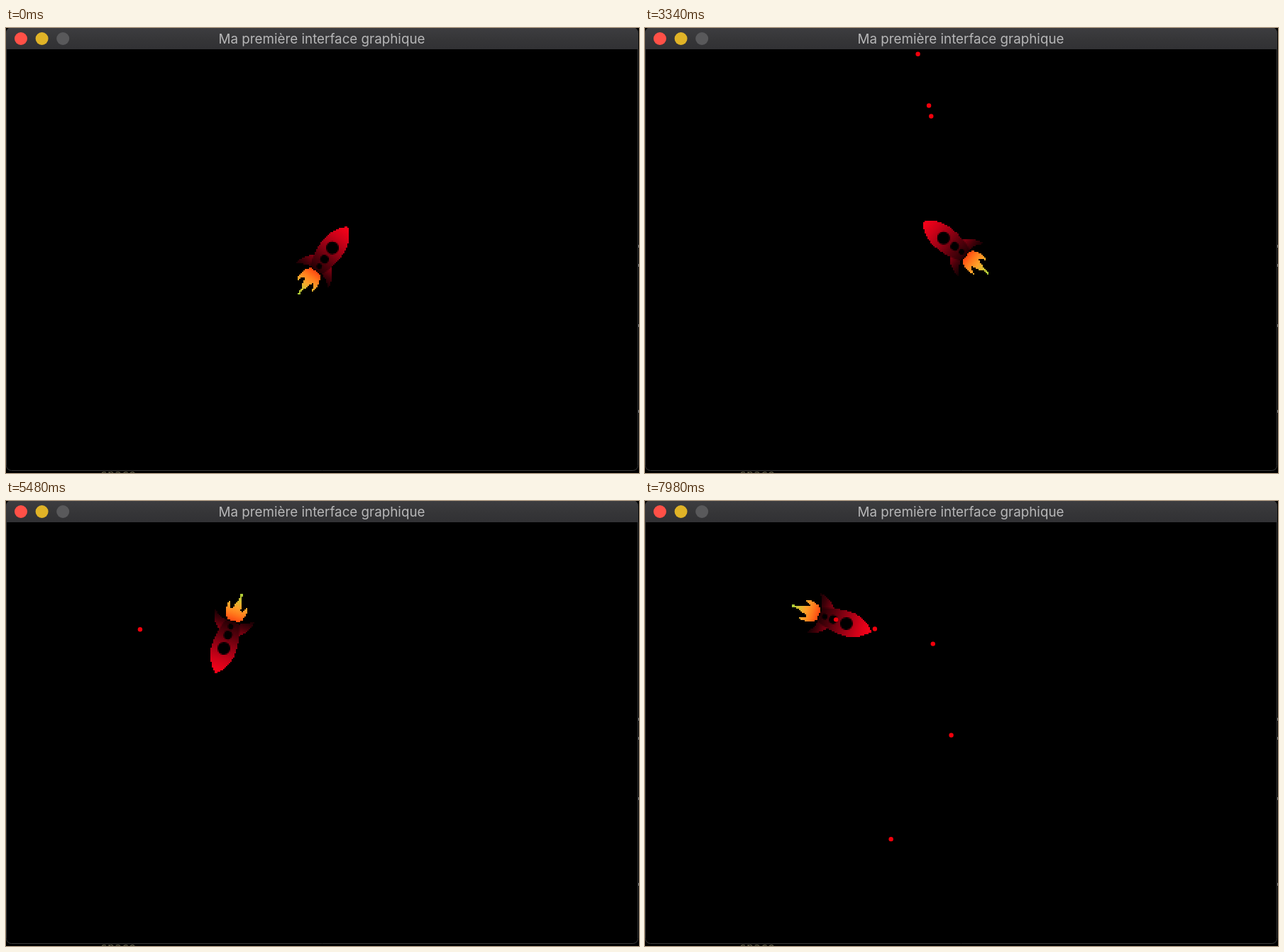
Write an HTML page with a canvas that moves like this. It is 892 px wide and 628 px high and loops after 8 s.

```html
<!DOCTYPE html>
<html lang="fr">
<head>
<meta charset="utf-8">
<title>Fusée</title>
<style>
  html, body { margin: 0; width: 100%; height: 100%; overflow: hidden; background: #000; }
  canvas { display: block; }
</style>
</head>
<body>
<canvas id="stage" width="892" height="628"></canvas>
<script>
const LOOP = 8;
const RAD = Math.PI / 180;
const HOME = { x: 446.5, y: 328 };
const START_ANGLE = 36.3;
const TURN_RATE = 65;
const SHOT_SPEED = 156;

// The flight follows from the pilot's input, in seconds: left key held,
// thrust taps with the speed they add, and shots.
const TURNS = [{ from: 0.53, to: 1.273 }, { from: 2.45, to: 3.058 }, { from: 3.786, to: 6.866 }];
const TAPS = [
  { at: 2.4, power: 14 },
  { at: 3.23, power: 70.3 },
  { at: 6.13, power: 63 },
  { at: 7, power: 35 },
  { at: 7.55, power: 36 }
];
const SHOTS = [1.432, 1.909, 2.007, 4.02, 5.925, 6.415, 6.93, 7.47, 7.93];

const ctx = document.getElementById('stage').getContext('2d');

// The rocket is drawn at half size, then enlarged with hard pixels.
const CELL = 72;
const sprite = document.createElement('canvas');
sprite.width = sprite.height = CELL;
const pen = sprite.getContext('2d', { willReadFrequently: true });

// Degrees clockwise from up
function heading(t) {
  const held = TURNS.reduce((sum, { from, to }) => sum + Math.max(0, Math.min(t, to) - from), 0);
  return START_ANGLE - TURN_RATE * held;
}

function advance(p, angle, d) {
  return { x: p.x + Math.sin(angle * RAD) * d, y: p.y - Math.cos(angle * RAD) * d };
}

// Frictionless drift: every tap adds a constant velocity along its heading.
function position(t) {
  return TAPS.filter(tap => tap.at < t)
    .reduce((p, { at, power }) => advance(p, heading(at), power * (t - at)), HOME);
}

function shade(c, y0, y1, colors) {
  const g = c.createLinearGradient(0, y0, 0, y1);
  colors.forEach((color, i) => g.addColorStop(i / (colors.length - 1), color));
  return g;
}

function disc(c, x, y, r, color) {
  c.fillStyle = color;
  c.beginPath();
  c.arc(x, y, r, 0, Math.PI * 2);
  c.fill();
}

// Shapes point up, centred on the pivot
const BODY = new Path2D('M0-59C9-52 17.5-38 17.5-23C17.5-8 15 6 10 17H-10C-15 6-17.5-8-17.5-23C-17.5-38-9-52 0-59Z');
const FIN = new Path2D('M14 1C24 8 28 16 29 28C24 22 18 19 10 17Z');
const HALF_FLAME = new Path2D('M-1 19H8C14 24 17 34 13 46C12 40 10 35 7 34C5 36 5 46 1.5 49L1 59H-1Z');
const BODY_FILL = shade(pen, -58, 17, ['#fa0219', '#d00118', '#980114', '#5a000c', '#250004']);
const FIN_FILL = shade(pen, 1, 28, ['#8c0012', '#440009', '#0e0002']);
const FLAME_FILL = shade(pen, 19, 58, ['#ff4a12', '#ff7a1c', '#ffa029', '#d8bd32', '#a9cc38']);

function drawRocket(t) {
  pen.setTransform(1, 0, 0, 1, 0, 0);
  pen.clearRect(0, 0, CELL, CELL);
  pen.translate(CELL / 2, CELL / 2);
  pen.rotate(heading(t) * RAD);
  pen.scale(0.5, 0.5);
  for (let side = 0; side < 2; side++) {
    pen.fillStyle = FIN_FILL;
    pen.fill(FIN);
    pen.fillStyle = FLAME_FILL;
    pen.fill(HALF_FLAME);
    pen.scale(-1, 1);
  }
  pen.fillStyle = BODY_FILL;
  pen.fill(BODY);
  disc(pen, 0, -22, 9, '#000');
  disc(pen, 0.5, -2.5, 6, '#000');
  disc(pen, 0.5, 10, 4, '#000');

  const img = pen.getImageData(0, 0, CELL, CELL);
  for (let i = 3; i < img.data.length; i += 4) img.data[i] = img.data[i] > 120 ? 255 : 0;
  pen.putImageData(img, 0, 0);

  const { x, y } = position(t);
  ctx.imageSmoothingEnabled = false;
  ctx.drawImage(sprite, Math.round(x - CELL), Math.round(y - CELL), CELL * 2, CELL * 2);
}

function drawShots(t) {
  for (const born of SHOTS.filter(s => s <= t)) {
    const { x, y } = advance(position(born), heading(born), (t - born) * SHOT_SPEED);
    disc(ctx, x, y, 3.2, '#f2000c');
  }
}

const BAR_FILL = shade(ctx, 0, 30, ['#3d3d40', '#363638', '#313134']);

function drawWindow() {
  ctx.fillStyle = '#000';
  ctx.fillRect(0, 0, 892, 628);

  // Slivers of the editor behind the window
  ctx.fillStyle = '#5d5b45';
  ctx.font = '16.6px "DejaVu Sans Mono", monospace';
  ctx.textAlign = 'left';
  ctx.fillText('space', 133, 635);
  ctx.fillStyle = '#777';
  [308, 335, 420, 541].forEach(y => ctx.fillRect(891, y - 2, 1, 4));

  ctx.save();
  ctx.beginPath();
  ctx.roundRect(0.5, -0.5, 890, 625, 7);
  ctx.fillStyle = '#000';
  ctx.fill();
  ctx.strokeStyle = '#3b3b3b';
  ctx.lineWidth = 1;
  ctx.stroke();
  ctx.clip();
  ctx.fillStyle = BAR_FILL;
  ctx.fillRect(0, 0, 892, 30);
  ctx.restore();

  ['#ff5047', '#e0b327', '#59595b'].forEach((color, i) => disc(ctx, 21 + i * 29.6, 15, 9, color));

  ctx.fillStyle = '#b7b7b8';
  ctx.font = '18.8px Inter, Roboto, sans-serif';
  ctx.textAlign = 'center';
  ctx.fillText('Ma première interface graphique', 445, 22);
}

function draw(t) {
  drawWindow();
  ctx.save();
  ctx.beginPath();
  ctx.rect(2, 30, 887, 594);
  ctx.clip();
  drawRocket(t);
  drawShots(t);
  ctx.restore();
}

const start = performance.now();
function tick() {
  draw(((performance.now() - start) / 1000) % LOOP);
  requestAnimationFrame(tick);
}
tick();
</script>
</body>
</html>
```
